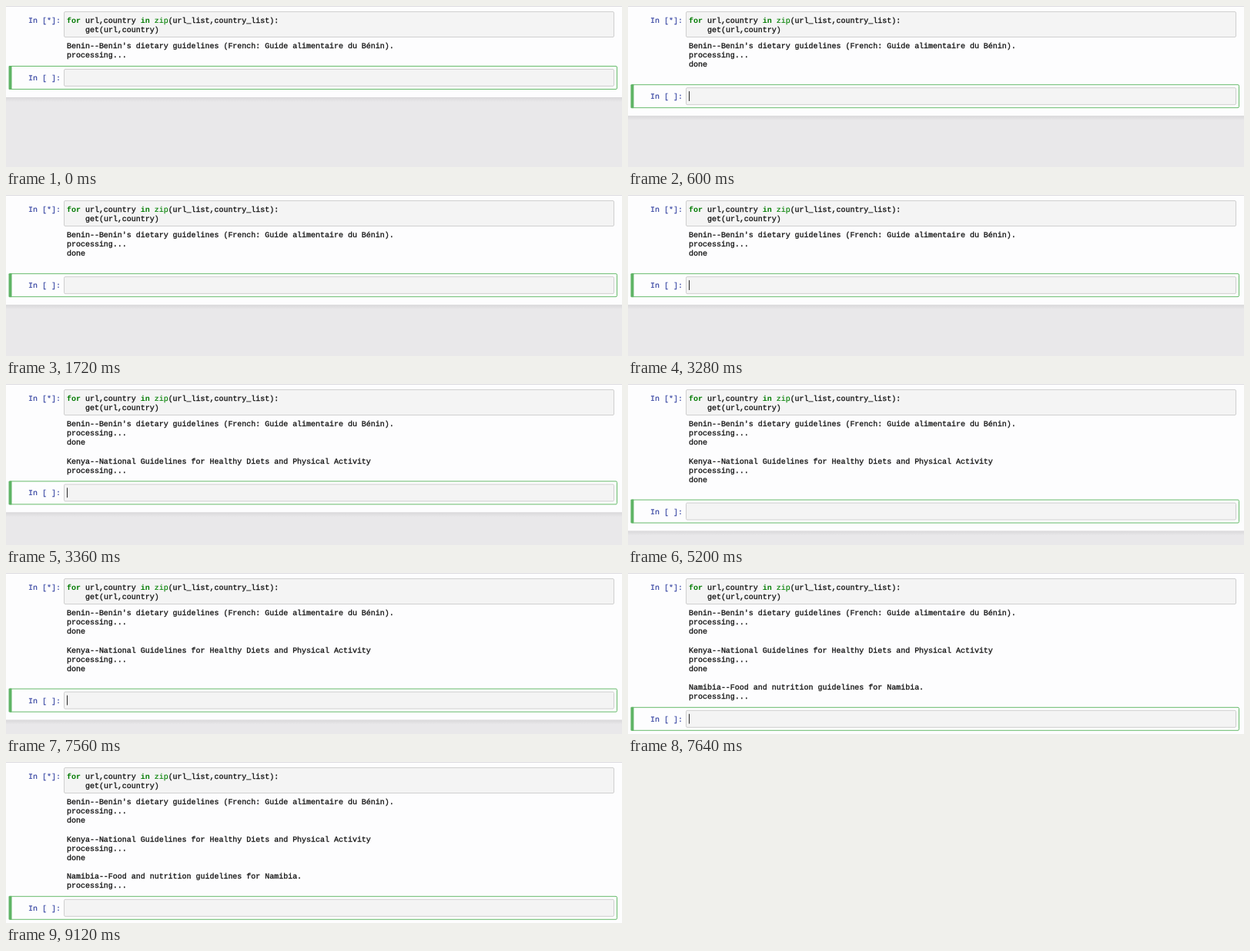
Write an HTML page that moves like this. It is 800x210 px and loops after 9400 ms.

```html
<!DOCTYPE html>
<html lang="en">
<head>
<meta charset="utf-8">
<title>Notebook output</title>
<style>
  html, body { margin: 0; width: 100%; height: 100%; overflow: hidden; background: #e9e8ea; }
  svg { display: block; width: 800px; height: 210px; }
  text {
    font: 9.98px "Liberation Mono", "Courier New", monospace;
    text-rendering: geometricPrecision;
    white-space: pre;
    fill: #111;
    stroke: #111;
    stroke-width: 0.3px;
  }
  .prompt { fill: #303f9f; stroke: #303f9f; stroke-width: 0.15px; }
  .keyword { fill: #007a00; stroke: none; font-weight: bold; }
  .builtin { fill: #008000; stroke: #008000; stroke-width: 0.15px; }
  .input { fill: #f4f4f4; stroke: #cfcfcf; }
</style>
</head>
<body>
<svg viewBox="0 0 800 210">
  <defs>
    <linearGradient id="shade" x1="0" y1="0" x2="0" y2="1">
      <stop offset="0" stop-color="#d9d8da"/>
      <stop offset="1" stop-color="#e9e8ea"/>
    </linearGradient>
  </defs>
  <rect width="800" height="210" fill="#e9e8ea"/>
  <rect id="page" width="800" height="119" fill="#fdfdfe"/>
  <rect width="800" height="1" fill="#dddce0"/>

  <text class="prompt" x="29" y="22">In [*]:</text>
  <rect class="input" x="75.5" y="7.5" width="714" height="33" rx="1.5"/>
  <text x="79" y="22"><tspan class="keyword">for</tspan> url,country <tspan class="keyword">in</tspan> <tspan class="builtin">zip</tspan>(url_list,country_list):</text>
  <text x="103" y="34">get(url,country)</text>

  <g id="output"></g>

  <g id="cell">
    <rect y="119" width="800" height="6" fill="url(#shade)"/>
    <rect x="4.5" y="78.5" width="789" height="30" rx="1.5" fill="none" stroke="#66bb6a"/>
    <rect x="3.5" y="78" width="4" height="31" rx="1" fill="#5fb465"/>
    <text class="prompt" x="29" y="97">In [ ]:</text>
    <rect class="input" x="75.5" y="82.5" width="714" height="22" rx="1.5"/>
    <rect id="caret" x="79" y="87" width="0.9" height="12.8" fill="#111"/>
  </g>
</svg>
<script>
const LOOP = 9400;
const LINE_HEIGHT = 12.1;
const ROWS_PER_PRINT = 2;
const ROWS = [
  "Benin--Benin's dietary guidelines (French: Guide alimentaire du Bénin).",
  "processing...",
  "done",
  "",
  "Kenya--National Guidelines for Healthy Diets and Physical Activity",
  "processing...",
  "done",
  "",
  "Namibia--Food and nutrition guidelines for Namibia.",
  "processing..."
];
const PRINT_TIMES = [600, 3360, 5200, 7640];
const BLINK_TIMES = [120, 640, 1160, 1720, 2240, 2760, 3280, 3840, 4360,
  4880, 5400, 5960, 6480, 7000, 7560, 8040, 8600, 9120];

const byId = id => document.getElementById(id);
const page = byId("page"), cell = byId("cell"), caret = byId("caret");

const rows = ROWS.map((content, i) => {
  const row = document.createElementNS("http://www.w3.org/2000/svg", "text");
  row.setAttribute("x", 79);
  row.setAttribute("y", 55.2 + i * LINE_HEIGHT);
  row.textContent = content;
  byId("output").append(row);
  return row;
});

const countPassed = (times, t) => times.filter(time => time <= t).length;
const show = (node, visible) => node.setAttribute("visibility", visible ? "visible" : "hidden");

function render(t) {
  const added = countPassed(PRINT_TIMES, t) * ROWS_PER_PRINT;
  const shift = added * LINE_HEIGHT;
  rows.forEach((row, i) => show(row, i < ROWS_PER_PRINT + added));
  page.setAttribute("height", 119 + shift);
  cell.setAttribute("transform", `translate(0 ${shift})`);
  show(caret, countPassed(BLINK_TIMES, t) % 2);
}

const start = performance.now();
function tick() {
  render((performance.now() - start) % LOOP);
  requestAnimationFrame(tick);
}
render(0);
requestAnimationFrame(tick);
</script>
</body>
</html>
```
